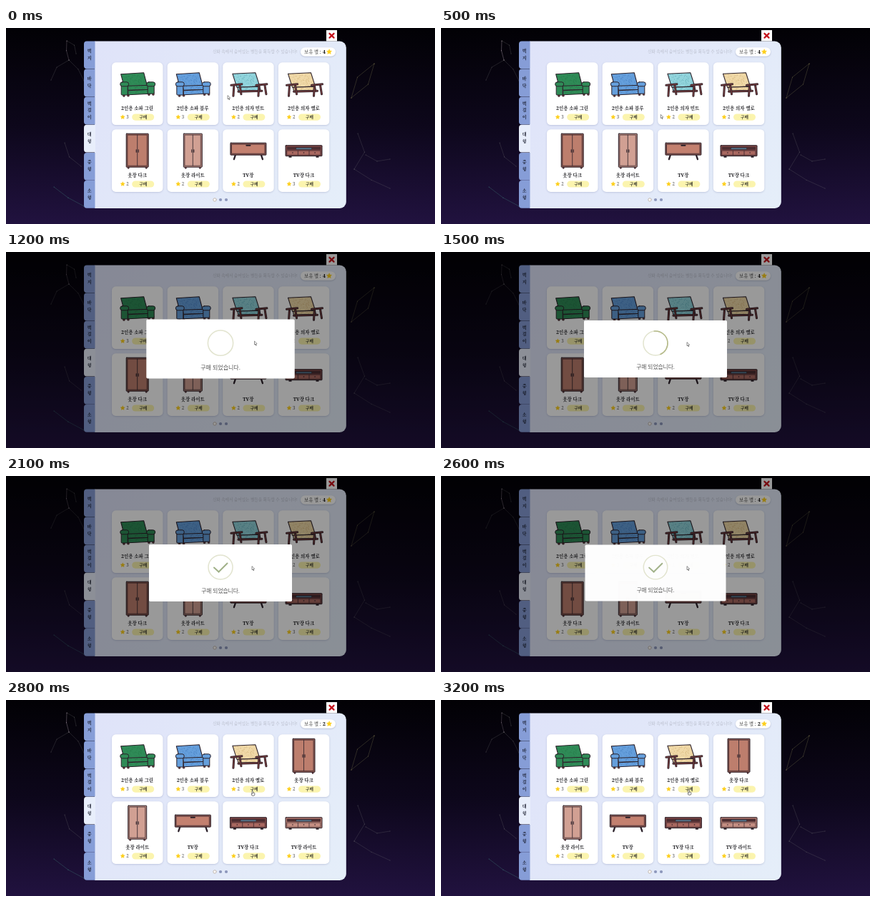
Animation of 600x275 px, one loop 3300 ms. Source, as an HTML page with a canvas:

```html
<!DOCTYPE html>
<html lang="ko">
<head>
<meta charset="utf-8">
<title>가구 상점</title>
<style>
html, body { margin: 0; width: 100%; height: 100%; overflow: hidden; background: #000; }
canvas { display: block; width: 600px; height: 275px; }
</style>
</head>
<body>
<canvas id="stage"></canvas>
<script>
const LOOP = 3300, STEP = 100, W = 600, H = 275;
const SERIF = '"Noto Serif", "Noto Serif CJK KR", "Noto Sans CJK KR", "Noto Sans CJK JP", serif';
const SANS = '"Open Sans", "Noto Sans CJK KR", "Noto Sans CJK JP", sans-serif';
const INK = '#2b2029', WOOD = '#713b3c';
const OPEN = 1200, CLOSING = 2600, BOUGHT = 2700, ARRIVED = 2800;
const canvas = document.getElementById('stage');
const ratio = window.devicePixelRatio || 1;
canvas.width = W * ratio;
canvas.height = H * ratio;
const c = canvas.getContext('2d');
c.scale(ratio, ratio);
c.lineJoin = c.lineCap = 'round';

const clamp = v => Math.max(0, Math.min(1, v));
const mix = (a, b, p) => a + (b - a) * p;
const ease = p => p * p * (3 - 2 * p);

function paint(fill, stroke, width = 1) {
  if (fill) { c.fillStyle = fill; c.fill(); }
  if (stroke) { c.strokeStyle = stroke; c.lineWidth = width; c.stroke(); }
}
function box(x, y, w, h, r, fill, stroke, width) {
  c.beginPath();
  c.roundRect(x, y, w, h, r);
  paint(fill, stroke, width);
}
function line(x1, y1, x2, y2, stroke, width) {
  c.beginPath();
  c.moveTo(x1, y1);
  c.lineTo(x2, y2);
  paint(null, stroke, width);
}
function disc(x, y, r, fill, stroke, width) {
  c.beginPath();
  c.arc(x, y, r, 0, Math.PI * 2);
  paint(fill, stroke, width);
}
function text(s, x, y, size, color, { align = 'center', font = SERIF, weight = 400 } = {}) {
  c.font = `${weight} ${size}px ${font}`;
  c.textAlign = align;
  c.fillStyle = color;
  c.fillText(s, x, y + size * 0.36);
}
function star(x, y, r) {
  c.beginPath();
  for (let i = 0; i < 10; i++) {
    const a = i * Math.PI / 5 - Math.PI / 2, d = i % 2 ? r * 0.5 : r;
    c.lineTo(x + d * Math.cos(a), y + d * Math.sin(a));
  }
  c.closePath();
  paint('#fdcf1c', '#fdcf1c', 0.5);
}
function shadowed(blur, color, draw) {
  c.save();
  c.shadowBlur = blur * ratio;
  c.shadowOffsetY = 0.8 * ratio;
  c.shadowColor = color;
  draw();
  c.restore();
}
function vertical(x, colors) {
  const g = c.createLinearGradient(x, 0, x, H);
  colors.forEach((color, i) => g.addColorStop(i / (colors.length - 1), color));
  return g;
}

// Leaning cushion with seeded fabric speckles
function cushion(x, y, w, h, lean, rise, [main, dot]) {
  c.beginPath();
  c.moveTo(x, y + rise);
  c.lineTo(x + w, y);
  c.lineTo(x + w + lean, y + h);
  c.lineTo(x + lean, y + h + rise);
  c.closePath();
  paint(main);
  let seed = 7;
  const rnd = () => (seed = seed * 16807 % 2147483647) / 2147483647;
  c.save();
  c.clip();
  c.fillStyle = dot;
  for (let i = w * h / 4; i > 0; i--) c.fillRect(x + rnd() * (w + lean), y + rnd() * (h + rise), 0.8, 0.7);
  c.restore();
  paint(null, INK, 1.1);
}
function limb(x1, y1, x2, y2) {
  line(x1, y1, x2, y2, INK, 3);
  line(x1, y1, x2, y2, WOOD, 1.6);
}

// Furniture, centred on 0,0
function sofa(cloth) {
  for (const x of [-20, -14, 15, 21]) box(x, 13.5 - x / 20, 2.5, 3.5, 0.5, WOOD, INK, 0.7);
  cushion(-23, -15.5, 32, 19, 5, 2, cloth);
  cushion(-14, 2, 31, 6, 1, 1, cloth);
  cushion(-13, 8, 31, 6, 0, 1.5, cloth);
  for (const x of [-24, 13]) {
    box(x + 1.5, 0, 9, 14.5 - x / 20, 1, cloth[0], INK, 1);
    box(x, -2.5, 12, 6, 3, cloth[0], INK, 1);
  }
}
function chair(cloth) {
  cushion(-22, -15.5, 32, 19, 6, 1.5, cloth);
  cushion(-15, 4, 31, 5, 1, 1, cloth);
  limb(-14, 11, 19, 10);
  for (const x of [-17, 18]) {
    limb(x - 3, 2, x - 4, 17);
    limb(x + 5, 2, x + 7, 14.5);
    limb(x - 7, 2, x + 8, 0.5);
  }
}
function wardrobe(main, edge, half) {
  for (const x of [-half + 2, half - 4]) box(x, 22, 2, 3, 0.3, WOOD, INK, 0.6);
  box(-half, -24, half * 2, 47, 0.6, edge, INK);
  box(2 - half, -22, half * 2 - 4, 43, 0, main, INK, 0.6);
  line(0, -22, 0, 21, INK, 0.8);
  for (const x of [-1.5, 1.5]) line(x, -1.5, x, 2, INK, 1.1);
}
function cabinet() {
  for (const side of [-1, 1]) line(side * 18, 6, side * 20, 12, INK, 2.3);
  box(-25, -11, 50, 17, 0.6, '#84504b', INK);
  box(-23, -9, 46, 13, 0, '#c3806f', INK, 0.6);
  box(-3.5, -8.5, 7, 2, 0.8, INK);
}
function stand(main, edge) {
  for (const x of [-21, 17]) box(x, 7, 4, 2.5, 0.3, INK);
  box(-25.5, -7.5, 51, 15, 0.6, edge, INK);
  box(-23.5, -5.5, 47, 4, 0, '#4b2d31');
  box(-11, -4.2, 22, 2.5, 0.3, '#56748a', INK, 0.5);
  for (const x of [-1, 0, 1]) {
    box(x * 15.6 - 7.8, 0, 15.6, 6, 0, main, INK, 0.5);
    disc(x * 15.6, 2.8, 0.8, INK);
  }
}

const ITEMS = [
  ['2인용 소파 그린', 3, () => sofa(['#2f8b57', '#287a4b'])],
  ['2인용 소파 블루', 3, () => sofa(['#659fdc', '#4a80c2'])],
  ['2인용 의자 민트', 2, () => chair(['#92d4dc', '#64afba'])],
  ['2인용 의자 옐로', 2, () => chair(['#f0d9a8', '#d5b67c'])],
  ['옷장 다크', 2, () => wardrobe('#bd7e6d', '#925a50', 15.5)],
  ['옷장 라이트', 2, () => wardrobe('#d1a093', '#b8877c', 13)],
  ['TV장', 2, cabinet],
  ['TV장 다크', 3, () => stand('#a96860', '#7b4544')],
  ['TV장 라이트', 3, () => stand('#c48e82', '#b0786e')]
];
const TABS = ['벽지', '바닥', '벽걸이', '대형', '중형', '소형'];

// Star chain between two points, bending to alternate sides
function chain(x1, y1, x2, y2, bend, parts, color = 'rgba(125,125,125,.4)') {
  const len = Math.hypot(x2 - x1, y2 - y1), nx = (y1 - y2) / len, ny = (x2 - x1) / len;
  const dots = [];
  for (let i = 0; i <= parts; i++) {
    const p = i / parts, d = i % parts ? (i % 2 ? bend : -bend) : 0;
    dots.push([mix(x1, x2, p) + nx * d, mix(y1, y2, p) + ny * d]);
  }
  c.beginPath();
  dots.forEach(d => c.lineTo(...d));
  paint(null, color, 0.6);
  dots.forEach(d => disc(...d, 0.6, color));
}

function drawSky(t) {
  c.fillStyle = vertical(0, ['#020105', '#0d071b', '#21123f']);
  c.fillRect(0, 0, W, H);
  chain(88, 45, 63, 73, 6, 2);
  chain(88, 45, 109, 74, -3, 2);
  chain(82, 161, 105, 194, 6, 2);
  for (const side of [-9, 9]) chain(515, 50, 483, 98, side, 2, 'rgba(150,145,95,.45)');
  chain(492, 148, 487, 198, -12, 2);
  chain(487, 198, 537, 225, 2, 2);
  chain(503, 178, 537, 184, 6, 2);
  chain(67, 223, 109, 250, 2, 2, 'rgba(70,135,130,.55)');
  const glow = 0.7 + 0.25 * Math.sin(t / 330);
  chain(85, 18, 88, 45, 2, 2, `rgba(200,180,195,${glow * 0.6})`);
  chain(85, 18, 98, 36, -5, 2);
}

function drawPanel(coins) {
  const g = c.createLinearGradient(124, 18, 476, 253);
  g.addColorStop(0, '#dfe3f9');
  g.addColorStop(1, '#e5eef9');
  box(124, 18.5, 351.8, 234.5, [0, 9, 9, 0], g);
  TABS.forEach((name, i) => {
    const y = 18.5 + i * 39.1, active = i === 3;
    box(109, y, active ? 16 : 15.5, 38.8, [4, 0, 0, 4], active ? '#e8eefb' : '#869dd7');
    const gap = name.length > 2 ? 9.3 : 10;
    [...name].forEach((ch, k) =>
      text(ch, 116.7, y + 18.4 + (k - (name.length - 1) / 2) * gap, 6, '#181c2c', { weight: 600 }));
  });
  text('신화 속에서 숨어있는 별들을 획득할 수 있습니다!', 407.6, 33, 5.6, '#b0b4c2', { align: 'right' });
  shadowed(2, 'rgba(80,90,130,.35)', () => box(412, 27.3, 49, 12.5, 6.2, '#fff'));
  text('보유 별 :', 417, 33.4, 6.4, '#222', { align: 'left', weight: 500 });
  text(coins, 445, 33.4, 7, '#111', { weight: 600 });
  star(452, 33.5, 3.7);
  disc(292, 241, 2.2, '#fff', '#b5a89c', 0.8);
  for (const x of [300, 308]) disc(x, 241, 2.1, '#8c96bb');
  box(448, 3, 15, 15.5, 0, '#fff');
  for (const d of [-3, 3]) line(455.5 - d, 7.8, 455.5 + d, 13.6, '#c5141d', 2.3);
}

function drawCard([name, price, art], i, loaded) {
  const x = 148 + (i % 4) * 77.6, y = i < 4 ? 48.3 : 142.2, mid = x + 35.7;
  shadowed(2.5, 'rgba(90,100,150,.3)', () => box(x, y, 71.5, 87.7, 5.5, '#fff'));
  if (loaded) {
    c.save();
    c.translate(mid, y + 30);
    art();
    c.restore();
  }
  text(name, mid, y + 64.8, 6.5, '#1c1c20', { weight: 600 });
  star(x + 15.2, y + 76.7, 3.1);
  text(price, x + 22, y + 76.7, 6.2, '#555');
  box(x + 28.2, y + 72.2, 31, 9.2, 4.6, '#fbf4ae');
  text('구매', x + 43.7, y + 76.7, 5.7, '#252522', { weight: 600 });
}

function popScale(t) {
  if (t >= CLOSING) return 0.985;
  const p = (t - 1070) / 300;
  if (p < 0.45) return mix(0.7, 1.05, p / 0.45);
  if (p < 0.8) return mix(1.05, 0.95, (p - 0.45) / 0.35);
  return mix(0.95, 1, clamp((p - 0.8) / 0.2));
}
function drawPopup(t) {
  const s = popScale(t);
  c.fillStyle = 'rgba(0,0,0,.4)';
  c.fillRect(0, 0, W, H);
  c.save();
  c.globalAlpha = t >= CLOSING ? 0.98 : 1;
  c.translate(300, 136);
  c.scale(s, s);
  box(-100, -40, 200, 80, 1.8, '#fff');
  disc(0, -8, 17, null, '#e2e4cf', 1.5);
  const turn = clamp((t - 1280) / 300);
  if (turn > 0 && turn < 1) {
    c.beginPath();
    c.arc(0, -8, 17, Math.PI * (turn * 2 - 2), Math.PI * (turn * 2 - 1.1));
    paint(null, '#b5ba8a', 1.5);
  }
  const tick = clamp((t - 1500) / 250);
  if (tick > 0) {
    const a = clamp(tick / 0.4), b = clamp(tick / 0.6 - 0.67);
    line(-9, -7.5, mix(-9, -2.5, a), mix(-7.5, -1.5, a), '#a0b088', 2);
    if (b > 0) line(-2.5, -1.5, mix(-2.5, 9.5, b), mix(-1.5, -13.5, b), '#a0b088', 2);
  }
  text('구매 되었습니다.', 0, 25, 7.7, '#545454', { font: SANS });
  c.restore();
}

// Pointer stops: time, x, y
const STOPS = [[0, 310, 95], [600, 307, 124], [1000, 347.5, 125], [1200, 347.5, 125.5], [1500, 344, 127], [3100, 344, 127], [3200, 346, 126]];
function drawCursor(t) {
  const next = STOPS.findIndex(s => s[0] > t);
  const b = STOPS[next < 0 ? STOPS.length - 1 : next], a = next < 0 ? b : STOPS[next - 1];
  const p = a === b ? 0 : ease((t - a[0]) / (b[0] - a[0]));
  c.save();
  c.translate(mix(a[1], b[1], p), mix(a[2], b[2], p));
  if ((t >= 1000 && t < OPEN) || t >= BOUGHT) {
    box(-0.6, 3, 4.4, 4.2, 1.5, '#fff', '#333', 0.7);
    box(0, 0, 1.3, 4.5, 0.6, '#fff', '#333', 0.5);
  } else {
    line(1.5, 3.5, 2.4, 5.6, '#444', 1);
    c.beginPath();
    c.moveTo(0, 0);
    c.lineTo(0, 4.6);
    c.lineTo(3.3, 3.3);
    c.closePath();
    paint('#fff', '#444', 0.6);
  }
  c.restore();
}

function draw(t) {
  const bought = t >= BOUGHT, arrived = t >= ARRIVED;
  drawSky(t);
  drawPanel(arrived ? '2' : '4');
  const list = bought ? ITEMS.filter((_, i) => i !== 2) : ITEMS.slice(0, 8);
  list.forEach((item, i) => drawCard(item, i, i < 7 || !bought || arrived));
  if (t >= OPEN && !bought) drawPopup(t);
  drawCursor(t);
}

let last = -1;
function tick() {
  const t = Math.floor(performance.now() % LOOP / STEP) * STEP;
  if (t !== last) draw(last = t);
  requestAnimationFrame(tick);
}
tick();
</script>
</body>
</html>
```
